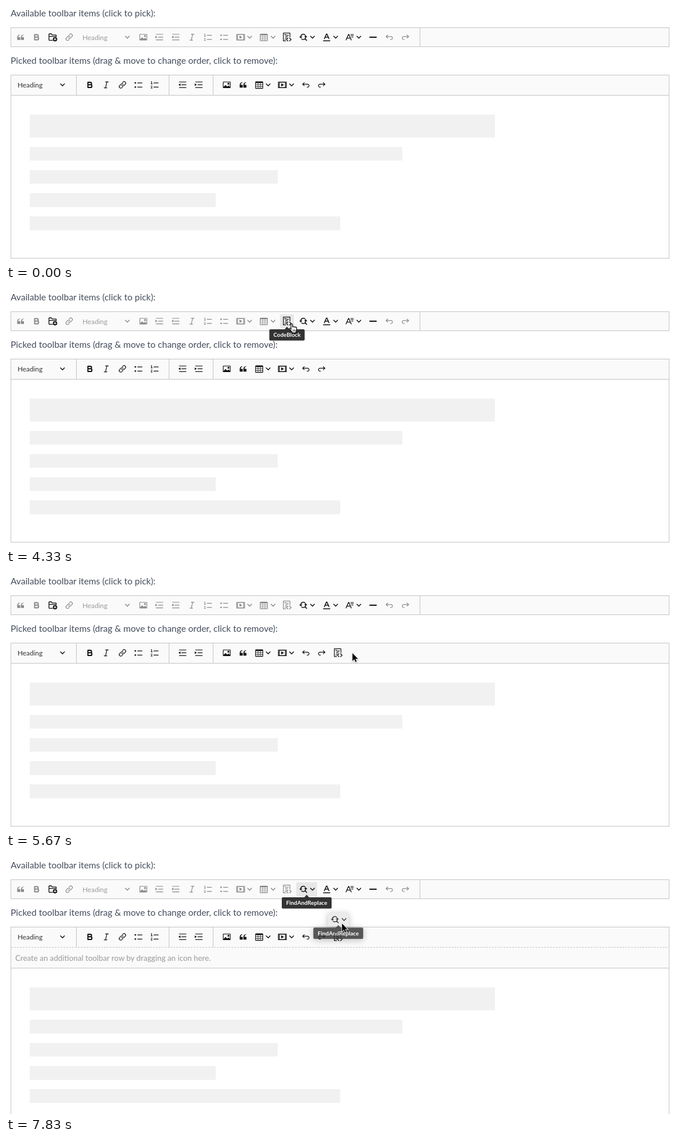
An HTML page for the animation above (8 s loop, 1153 by 443 pixels).

```html
<!DOCTYPE html>
<html lang="en">
<head>
<meta charset="utf-8">
<title>Toolbar builder</title>
<style>
  html, body { margin: 0; width: 100%; height: 100%; overflow: hidden; background: #fff; }
  svg { display: block; width: 100vw; height: 100vh; }
  text { font: 15.5px Lato, "Open Sans", sans-serif; fill: #434c5c; }
  .small { font-size: 11.8px; fill: #333; }
  .note { font-size: 13.35px; fill: #999; }
  .tip { font-size: 9.8px; font-weight: 700; fill: #fff; text-anchor: middle; }
  .box { fill: #fafafa; stroke: #c4c4c4; }
  .rule { fill: none; stroke: #c4c4c4; }
  .icon { fill: none; stroke: #111; stroke-width: 1.5; stroke-linecap: round; stroke-linejoin: round; }
  .icon .solid { fill: #111; stroke: none; }
  .dim { opacity: .48; }
  .ghost { opacity: .82; filter: drop-shadow(0 2px 6px rgba(0, 0, 0, .3)); }
  #cursor { filter: drop-shadow(0 1px 1px rgba(0, 0, 0, .3)); }
</style>
</head>
<body>
<svg id="stage" viewBox="0 0 1153 443" preserveAspectRatio="none"></svg>
<script>
const line = (d, w = 1.5) => `<path d="${d}" stroke-width="${w}"/>`;
const solid = d => `<path class="solid" fill-rule="evenodd" d="${d}"/>`;
const quoteMark = x => solid(`M${x} 10.4a6.5 6.5 0 0 1 6.06-6.4v.7C6.4 5.4 5.4 7.7 5.2 10H9q.5 0 .5 1v4.5q0 .5-1 .5h-5q-.5 0-.5-1z`
  .replace("C6.4 5.4 5.4 7.7 5.2 10H9q.5 0 .5 1v4.5q0 .5-1 .5h-5q-.5 0-.5-1z",
           "c-2.6.7-3.7 3-3.85 5.3h3.8q.5 0 .5 1v4.5q0 .5-1 .5h-5q-.5 0-.5-1z"));
const listRows = line("M7.7 5.75h9.6M7.7 14.75h9.6");
const textRows = line("M2.7 3.75h14.6M7.7 9.75h9.6M2.7 15.75h14.6");
const undoPath = line("M6.7 5.3L3 8.6l3.7 3.2M3 8.6H14a3.2 3.2 0 1 1-1.3 6.2");

// Icons on a 20 x 20 grid
const icons = {
  quote: quoteMark(3) + quoteMark(11),
  bold: line("M5.5 4.3h5a2.75 2.75 0 0 1 0 5.5h-5zV15.7h5.6a2.9 2.9 0 0 0 0-5.9h-.6", 2.5),
  italic: line("M8.5 3.7h6M5.5 16.3h6M11.5 3.7L8.5 16.3"),
  link: line("M8.3 11a3.3 3.3 0 0 0 5 .4l2.7-2.8a3.3 3.3 0 0 0-4.7-4.7l-1.5 1.5M11.7 9a3.3 3.3 0 0 0-5-.4L4 11.4a3.3 3.3 0 0 0 4.7 4.7l1.5-1.5"),
  bullets: listRows + line("M2.75 5.75h.01M2.75 14.75h.01", 3.5),
  numbers: listRows + line("M1.6 3.6l1.4-.8v5M1.5 7.8h3M1.3 13c.4-1.5 3.2-1.2 2.6.6L1.3 17h3.2", 1.2),
  indent: textRows + solid("M1 7l4.4 2.7L1 12.5z"),
  outdent: textRows + solid("M5.2 7L.8 9.7l4.4 2.8z"),
  image: solid("M6.9 10.5q.4-.3.9 0l3.35 3.2 2.2-2q.5-.4.9 0l2.5 3V4.5H3.2v10.1zM17.2 3q1.1 0 1.1 1v12q0 1-1.1 1H2.8q-1.1 0-1.1-1V4q0-1 1.1-1zM11.7 7.6a1.96 1.96 0 1 1 3.9 0 1.96 1.96 0 1 1-3.9 0z"),
  table: solid("M3 6v3h4V6zm0 4v3h4v-3zm0 4v3h4v-3zm5 3h4v-3H8zm5 0h4v-3h-4zm4-4v-3h-4v3zm0-4V6h-4v3zm1.5 8a1.5 1.5 0 0 1-1.5 1.5H3A1.5 1.5 0 0 1 1.5 17V4q.4-1.5 2-1.5h13q1.6 0 2 1.5zM12 13v-3H8v3zm0-4V6H8v3z"),
  media: solid("M.7 3h18.6v14H.7zM4.2 5v10h11.6V5zM7.5 6.6l6 3.4-6 3.4z")
    + `<path d="M2.5 4v12M17.5 4v12" stroke="#fafafa" stroke-width="1" stroke-linecap="butt" stroke-dasharray="1 1"/>`,
  undo: undoPath,
  redo: `<g transform="matrix(-1 0 0 1 20 0)">${undoPath}</g>`,
  rule: line("M3 10h14", 2.2),
  code: line("M7 18H2.2V1.2H16.4V9.5")
    + line("M5 4.5h2.2l1 1.2M10 5.7h3M7 8.7h4M7 11.6h2M5.5 14.5h1") + line("M12 11.8L8.7 15l3.3 3.2M15.6 11.8L18.9 15l-3.3 3.2", 1.7),
  find: line("M4.2 9.5a5.4 5.4 0 0 1 9.3-4.3M14.8 8.5a5.4 5.4 0 0 1-8.8 5.2M13.2 13.6l3.6 3.2", 1.9)
    + solid("M.8 8.6h6.8L4.2 12.4zM11.2 9.8h7L14.8 6z"),
  color: line("M5 13.3L9.6 3h.8L15 13.3M6.6 10h6.8", 1.8) + line("M3 17.7h14", 1.8),
  family: line("M1.8 16L7 4h.8l5.2 12M3.8 12h7.2", 1.7) + line("M11.8 4h6M12.6 7h5M13.8 10h3", 1.3),
  folder: line("M9 16.8H2.3q-.8 0-.8-.8V3.6q0-.8.8-.8h4.4l1.8 2.4h7.7q.8 0 .8.8v3M1.5 8.2h14", 1.7)
    + solid("M14.5 9.6a4.8 4.8 0 1 0 .01 0zM13.8 11.6h1.4v2.1h2.1v1.4h-2.1v2.1h-1.4v-2.1h-2.1v-1.4h2.1z"),
  chevron: line("M5.8 7.9L10 12.1l4.2-4.2", 1.8)
};

const icon = (name, x, y, cls = "") =>
  `<g class="icon ${cls}" transform="translate(${x - 8} ${y - 8}) scale(.8)">${icons[name]}</g>`;
const text = (s, x, y, cls = "") => `<text class="${cls}" x="${x}" y="${y}">${s}</text>`;
const group = (id, body, cls = "") => `<g id="${id}" class="${cls}">${body}</g>`;
const rect = (x, y, w, h, attrs) => `<rect x="${x}" y="${y}" width="${w}" height="${h}" ${attrs}/>`;
const row = (y, cls, items) => items.map(([name, x]) => icon(name, x, y, cls)).join("");

// A raised button with its tooltip, centred on 0,0
const button = (width, tipWidth, label, content) =>
  rect(-width / 2, -12, width, 24, 'rx="1.5" fill="#e7e7e7"') + content
  + `<path d="M-4.5 14.5L0 9.5l4.5 5z" fill="#333"/>`
  + rect(-tipWidth / 2, 14, tipWidth, 19.5, 'rx="2" fill="#333"') + text(label, 0, 27.3, "tip");
const codeButton = button(24, 61, "CodeBlock", icon("code", 0, 0));
const findButton = button(36, 86, "FindAndReplace", icon("find", -5.5, 0) + icon("chevron", 10, 0));

const bars = [[188, 39.5, 803], [244, 23.5, 643], [284, 23.5, 428], [324, 24, 321], [364, 24, 536]];

const stage = document.getElementById("stage");
stage.innerHTML =
  text("Available toolbar items (click to pick):", 8, 18)
  + rect(8.5, 37.5, 1136, 33, 'class="box"') + '<path class="rule" d="M714.5 38v32"/>'
  + row(54, "dim", [["quote", 25], ["bold", 53], ["link", 109], ["chevron", 209.5], ["image", 237], ["indent", 265],
    ["outdent", 293], ["italic", 321], ["numbers", 349], ["bullets", 377], ["media", 405], ["chevron", 420.5],
    ["table", 445], ["chevron", 461], ["undo", 661.5], ["redo", 689.5]])
  + text("Heading", 132, 58.5, "small dim")
  + row(54, "", [["folder", 81], ["find", 513.5], ["chevron", 529], ["color", 553.5], ["chevron", 569],
    ["family", 593.5], ["chevron", 609], ["rule", 633.5]])
  + group("codeItem", icon("code", 485, 54))
  + text("Picked toolbar items (drag &amp; move to change order, click to remove):", 8, 100)
  + rect(8.5, 119.5, 1136, 35, 'class="box"')
  + '<path class="rule" d="M121.5 120v34M281.5 120v34M357.5 120v34"/>'
  + text("Heading", 20, 140.5, "small")
  + row(136.5, "", [["chevron", 97.5], ["bold", 145], ["italic", 173], ["link", 201], ["bullets", 229], ["numbers", 257],
    ["outdent", 305], ["indent", 333], ["image", 381], ["quote", 409], ["table", 437], ["chevron", 452.5],
    ["media", 477], ["chevron", 493], ["undo", 517.5], ["redo", 545]])
  + group("picked", icon("code", 573, 136.5))
  + group("editor", rect(8.5, 154.5, 1136, 282, 'fill="#fff" stroke="#c4c4c4"')
    + bars.map(([y, h, w]) => rect(41, y, w, h, 'fill="#f1f1f1"')).join(""))
  + group("extra", rect(9, 154, 1135, 36, 'fill="#fafafa"')
    + '<path class="rule" stroke-dasharray="3 2" d="M9 154.5h1135"/><path class="rule" d="M8.5 154v37M1144.5 154v37"/>'
    + text("Create an additional toolbar row by dragging an icon here.", 16, 178, "note"))
  + group("codeHover", `<g transform="translate(485 54)">${codeButton}</g>`)
  + group("findHover", `<g transform="translate(519 54)">${findButton}</g>`)
  + group("codeGhost", codeButton, "ghost") + group("findGhost", findButton, "ghost")
  + group("cursor",
    group("arrow", '<path d="M0 0v13.4l3.1-2.9 2.2 4.7 2.1-.9-2.2-4.6h4.3z" stroke="#fff" stroke-width="1.6" paint-order="stroke"/>')
    + group("plus", '<circle cx="9.3" cy="22" r="9.5" fill="#339a20"/><path d="M4.3 22h10M9.3 17v10" stroke="#fff" stroke-width="2.2"/>')
    + group("hand", '<path fill="#fff" stroke="#000" stroke-width="1.1" d="M4 10V1.8a1.3 1.3 0 0 1 2.6 0V6.4a1.2 1.2 0 0 1 2.4.1 1.2 1.2 0 0 1 2.3.5 1.1 1.1 0 0 1 2.2.6V11c0 2-1.2 2.8-1.4 5H6.2C5.8 13.8 2.8 11.8 1 9.6c-.7-1 .6-2 1.6-1.2z"/><path d="M7.3 10.5v3.2M9.2 10.5v3.2M11.1 10.5v3.2" stroke="#000" stroke-width=".8"/>'));

// Pointer poses: step, shape, x, y
const poses = [
  [5, "arrow", 812, 194], [6, "arrow", 752, 122], [7, "arrow", 694, 64], [8, "arrow", 674, 49.5],
  [19, "hand", 610, 48], [20, "hand", 554, 51], [21, "hand", 513, 55], [22, "hand", 491, 57], [23, "hand", 488, 56.5],
  [26, "hand", 488, 58], [27, "copy", 506, 76], [28, "arrow", 545, 117], [29, "arrow", 581, 132], [30, "arrow", 598, 137],
  [35, "arrow", 594, 131], [36, "arrow", 580, 114], [37, "arrow", 560, 92], [38, "arrow", 540, 74],
  [39, "hand", 522, 62], [40, "hand", 518, 60], [41, "hand", 520, 62], [42, "hand", 521.5, 63],
  [45, "copy", 534, 70], [46, "arrow", 560, 92], [47, "arrow", 580, 113.5]
];

const el = id => document.getElementById(id);
const show = (id, on) => el(id).style.display = on ? "" : "none";
const place = (id, x, y) => el(id).setAttribute("transform", `translate(${x} ${y})`);
const LOOP = 8000, STEPS = 48;

function draw(now) {
  // The screen was refreshed six times a second
  const step = Math.min(STEPS - 1, Math.floor((now % LOOP + 4) * STEPS / LOOP));
  const within = (from, to) => step >= from && step <= to;
  const pose = poses.filter(p => p[0] <= step).pop();
  const codeDrag = within(28, 33), findDrag = within(46, 47);

  show("cursor", pose);
  if (pose) {
    const [, shape, x, y] = pose;
    place("cursor", x, y);
    show("arrow", shape !== "hand");
    show("hand", shape === "hand");
    show("plus", shape === "copy");
    place("codeGhost", x - 9.5, y + 4);
    place("findGhost", x - 6.5, y - 7);
  }
  show("codeHover", within(22, 33));
  show("findHover", within(39, 47));
  show("codeGhost", codeDrag);
  show("findGhost", findDrag);
  show("extra", codeDrag || findDrag);
  place("editor", 0, codeDrag || findDrag ? 36 : 0);
  show("picked", step >= 29);
  el("codeItem").setAttribute("class", step >= 34 ? "dim" : "");
  requestAnimationFrame(draw);
}

const start = performance.now();
const tick = () => { draw(performance.now() - start); };
const raf = window.requestAnimationFrame.bind(window);
window.requestAnimationFrame = () => raf(tick);
tick();
</script>
</body>
</html>
```
